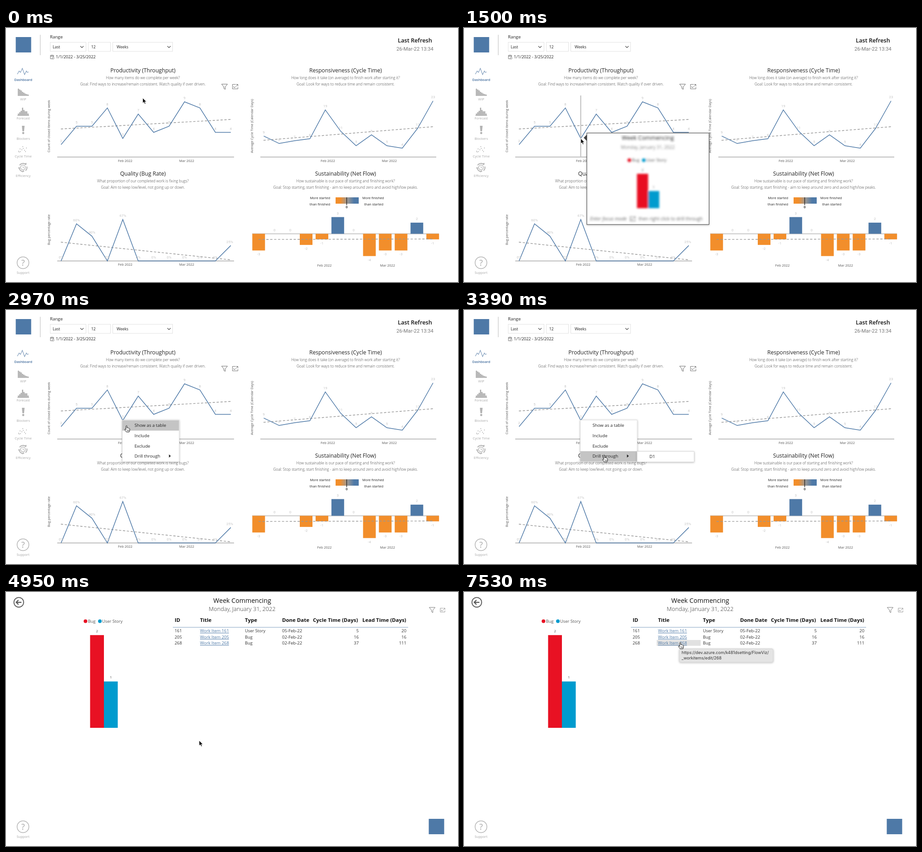
Write an HTML page that moves like this. It is 997 px wide and 561 px high and loops after 8.01 s.

```html
<!DOCTYPE html>
<html lang="en">
<head>
<meta charset="utf-8">
<title>Flow dashboard</title>
<style>
  html, body { margin: 0; width: 100%; height: 100%; overflow: hidden; background: #fff; }
  svg { display: block; width: 100%; height: 100%; font-family: "Open Sans", "Noto Sans", sans-serif; }
  .num { font-family: Roboto, "Noto Sans", sans-serif; }
  .ui { font-family: Inter, Roboto, sans-serif; }
</style>
</head>
<body>
<svg id="stage" viewBox="0 0 997 561" xmlns="http://www.w3.org/2000/svg"></svg>
<script>
const BLUE = '#4e79a7', ORANGE = '#f28e2b', RED = '#e81123', CYAN = '#009bce';
const GREY = '#b3b3b3', AXIS = '#c8c8c8', LABEL = '#c4c4c4', TREND = '#979797';
const LOOP = 8010;

// Drawing helpers
const text = (x, y, size, str, fill = '#333', more = '') =>
  `<text x="${x}" y="${y}" font-size="${size}" fill="${fill}" ${more}>${str}</text>`;
const MID = 'text-anchor="middle"', END = 'text-anchor="end"', LIGHT = 'font-weight="300"';
const rect = (x, y, w, h, fill, more = '') =>
  `<rect x="${x}" y="${y}" width="${w}" height="${h}" fill="${fill}" ${more}/>`;
const dot = (x, y, r, fill) => `<circle cx="${x}" cy="${y}" r="${r}" fill="${fill}"/>`;
const path = (d, stroke, width = 1, more = '') =>
  `<path d="${d}" fill="none" stroke="${stroke}" stroke-width="${width}" ${more}/>`;
const group = (id, body, more = '') => `<g id="${id}" ${more}>${body}</g>`;
const trend = (x1, y1, x2, y2) => path(`M${x1} ${y1}L${x2} ${y2}`, TREND, 1.4, 'stroke-dasharray="5 3.6"');
const num = (x, y, str, more = MID) => text(x, y, 8, str, LABEL, `class="num" ${more}`);

const funnel = (x, y, c) => path(`M${x - 6.5} ${y - 5.5}h13l-5 6v5.5l-3 -2v-3.5z`, c);
const focusIcon = (x, y, c, s = 1) => path('M1 -5H-6V5H6V1M2 -5H6V-1M6 -5L0 1M-3 -1V2H0', c, 1,
  `transform="translate(${x} ${y}) scale(${s})"`);
const logo = (x, y) => rect(x, y, 34, 34, BLUE);
const support = () => `<circle cx="37.5" cy="518.5" r="13" fill="none" stroke="${GREY}" stroke-width="1.5"/>`
  + text(37.5, 525, 18, '?', '#a5a5a5', MID) + text(37.5, 543, 7.5, 'Support', '#a5a5a5', MID);

function heading(x, y, title, first, second) {
  return text(x, y, 12.1, title, '#222', MID)
    + text(x, y + 15.3, 8.3, first, '#3c3c3c', `${MID} ${LIGHT}`)
    + text(x, y + 29, 8.3, second, '#3c3c3c', `${MID} ${LIGHT}`);
}
const axisTitle = (x, y, str) => text(0, 0, 7.2, str, '#555', `${MID} transform="translate(${x} ${y}) rotate(-90)"`);
const months = (a, b, y) => text(a, y, 7.5, 'Feb 2022', '#555', MID) + text(b, y, 7.5, 'Mar 2022', '#555', MID);

function lineChart(x0, step, base, unit, values, slope, unitName = '') {
  const at = values.map((v, i) => [x0 + i * step, base - unit * v]);
  const labels = at.map(([x, y], i) => {
    const last = unitName && i === values.length - 1;
    return num(last ? x + 5 : x, y - 5.6, Math.round(values[i]) + unitName, last ? END : MID);
  });
  return trend(...slope) + path('M' + at.map(p => p.join(' ')).join('L'), BLUE, 1.5) + labels.join('');
}
const axis = (x1, x2, y) => path(`M${x1} ${y}H${x2}`, AXIS, 2.4);

function barChart(values) {
  const base = 454.5, unit = 12.3;
  let out = path(`M543 ${base}H955`, AXIS, 2);
  values.forEach((v, i) => {
    const x = 543.3 + i * 34.9, h = Math.abs(v) * unit;
    if (v) out += rect(x, v > 0 ? base - h : base, 28, h, v > 0 ? BLUE : ORANGE);
    out += num(x + 14, v < 0 ? base + h + 11 : base - h - 5.8, v);
  });
  return out + trend(557, 467, 941, 466);
}

function sidebar() {
  const names = ['WIP', 'Forecast', 'Blockers', 'Cycle Time', 'Efficiency'];
  const rows = [159.5, 202, 246.5, 286, 329];
  const bars = (x, y, hs) => hs.map((h, i) => rect(x + i * 3.05, y - h, 2.8, h, GREY)).join('');
  const spots = [[28, 272], [32, 273], [35, 269], [31, 267], [38, 266], [41, 270], [43, 273], [37, 262], [45, 265], [29, 274]];
  return path('M25 102l4 -7 3 3 4 -9 5 14 4 -8 2 3 3 -1', '#7d9abb', 1.2)
    + text(38, 117, 7.5, 'Dashboard', '#3f6a9b', `${MID} font-weight="600"`)
    + bars(26, 150, [16, 14, 12, 9, 7, 5, 4, 3])
    + bars(26, 193, [4, 7, 10, 17, 12, 9, 9, 4])
    + path('M25 193.5H51', GREY)
    + `<path d="M35 216h6l-1.2 12h-3.6z" fill="${GREY}"/>` + dot(38, 232, 2.4, GREY)
    + spots.map(([x, y]) => dot(x, y, 1, GREY)).join('')
    + path('M30 303a9 9 0 0 1 14 -1M46 306a9 9 0 0 1 -3 9M39 317a9 9 0 0 1 -10 -8M27 309h4M44 302v-4M36 318l4 -3', GREY, 2)
    + `<circle cx="37.5" cy="308" r="5.3" fill="none" stroke="${GREY}" stroke-width="1.3"/>`
    + path('M37.5 305v3.5h3', GREY)
    + names.map((n, i) => text(38, rows[i], 7.5, n, '#a8a8a8', MID)).join('');
}

function filters() {
  const box = (x, w) => rect(x + .5, 31.5, w, 20, '#fff', 'stroke="#e2e2e2"');
  const chevron = x => path(`M${x - 3.5} 40l3.5 3.5 3.5 -3.5`, '#444', 1.1);
  return path('M75.5 15V60', '#bbb') + text(97, 22.5, 9.7, 'Range', '#222')
    + box(97, 79) + box(181, 49) + box(235, 132) + chevron(167.5) + chevron(359.5)
    + text(103, 45, 8.5, 'Last', '#222') + text(188, 45, 8.5, '12', '#222') + text(244, 45, 8.5, 'Weeks', '#222')
    + path('M104 68H98V60.500H105V64M98 62.500H105M100 59v2M103 59v2', '#666', .9)
    + '<circle cx="104" cy="66.500" r="2" fill="#fff" stroke="#666" stroke-width=".8"/>'
    + text(110, 67.2, 9, '1/1/2022 - 3/25/2022', '#222')
    + text(902, 31.5, 12.7, 'Last Refresh', '#111', `${MID} font-weight="600"`)
    + text(902, 50, 11.2, '26-Mar-22 13:34', '#777', `${MID} class="num"`);
}

function legend() {
  return rect(727, 374, 51, 14, 'url(#ramp)') + path('M751.500 374V391', '#222', 1.4)
    + text(751.5, 398, 7.8, '0', '#111', `${MID} font-weight="600"`)
    + text(715, 378, 7.4, 'More started', '#222', END) + text(715, 392, 7.4, 'than finished', '#222', END)
    + text(786, 378, 7.4, 'More finished', '#222') + text(790, 392, 7.4, 'than started', '#222');
}

function dashboard() {
  return logo(21.5, 20) + filters() + sidebar() + support()
    + heading(302, 98, 'Productivity (Throughput)', 'How many items do we complete per week?',
      'Goal: Find ways to increase/remain consistent. Watch quality if over driven.')
    + heading(749, 97.5, 'Responsiveness (Cycle Time)', 'How long does it take (on average) to finish work after starting it?',
      'Goal: Look for ways to reduce time and remain consistent.')
    + heading(302, 326, 'Quality (Bug Rate)', 'What proportion of our completed work is fixing bugs?',
      'Goal: Aim to keep low/level, not going up or down.')
    + heading(749, 326, 'Sustainability (Net Flow)', 'How sustainable is our pace of starting and finishing work?',
      'Goal: Stop starting, start finishing - aim to keep around zero and avoid high/low peaks.')
    + funnel(482, 129.5, '#666') + focusIcon(505.5, 129.5, '#777')
    + axisTitle(96.5, 217, 'Count of closed items during week')
    + axisTitle(544.5, 216.5, 'Average Cycle Time (Calendar Days)')
    + axisTitle(96.5, 445.5, 'Bug percentage rate')
    + axis(113, 503, 285) + axis(561, 949, 285) + axis(113, 503, 514.5)
    + lineChart(121.5, 34.03, 284.5, 13.5, [2, 5, 5, 8, 3, 7, 4, 5, 9, 8, 4, 4], [121, 223, 496, 202])
    + lineChart(568.5, 33.95, 287.5, 5.5, [8.9, 5.9, 7, 7.8, 19.4, 10.8, 5, 9.4, 5, 4, 12, 23], [568, 248, 942, 218])
    + lineChart(121.5, 34.03, 514.5, 1.366, [0, 60, 40, 0, 67, 0, 0, 0, 0, 0, 0, 25], [121, 473, 496, 512], '%')
    + months(263, 398.5, 296) + months(710, 845.5, 296) + months(263, 398.5, 525) + months(702.5, 841.5, 526.5)
    + legend() + barChart([-3, 0, 0, -2, -1, 3, 0, -4, -3, -3, 2, -1])
    + group('guide', path('M257.500 149V284', '#b5b5b5', 1.8));
}

// Work item counts: legend and two bars
function countChart(x, y, barX, barW, base, unit) {
  return dot(x, y, 4, RED) + text(x + 5.5, y + 3.2, 9.3, 'Bug', '#555')
    + dot(x + 31.8, y, 4, CYAN) + text(x + 36.8, y + 3.2, 9.3, 'User Story', '#555')
    + rect(barX, base - 2 * unit, barW, 2 * unit, RED) + rect(barX + barW, base - unit, barW, unit, CYAN)
    + text(barX + barW / 2, base - 2 * unit - 6.3, 8, '2', '#555', MID)
    + text(barX + barW * 1.5, base - unit - 6.3, 8, '1', '#555', MID);
}

function popup() {
  return '<path d="M271.500 235l-7.500 7.500 7.500 7.500z" fill="#444"/>'
    + rect(271, 232, 269.5, 202, '#fff', 'stroke="#3a3a3a" filter="url(#shade)"')
    + group('details', text(405.5, 246.5, 12.8, 'Week Commencing', '#222', MID)
      + text(405.5, 267, 10.3, 'Monday, January 31, 2022', '#444', `${MID} ${LIGHT}`)
      + countChart(364.7, 292, 381.5, 24.6, 398, 38)
      + text(278, 425, 10.6, 'Enter focus mode', '#666', 'font-style="italic"')
      + focusIcon(372, 421.5, '#666', .95)
      + text(385, 425, 10.05, 'then right click to drill through', '#666'));
}

const ITEMS = ['Show as a table', 'Include', 'Exclude', 'Drill through'];
function contextMenu() {
  return rect(256.5, 243, 125.5, 92, '#fff', 'stroke="#d5d5d5" stroke-width=".8" filter="url(#shade)"')
    + group('pick', rect(256.5, 0, 125, 22.7, '#c4c4c4'))
    + ITEMS.map((s, i) => text(283.5, 258.2 + i * 22.7, 9.65, s, '#222')).join('')
    + '<path d="M359.500 319l4 3.500 -4 3.500z" fill="#222"/>';
}
const submenu = () => rect(382, 312.5, 125.5, 23, '#fff', 'stroke="#d5d5d5" stroke-width=".8" filter="url(#shade)"')
  + group('subPick', rect(382, 312.5, 125, 22.7, '#c4c4c4')) + text(409, 327, 9.65, 'D1', '#222');

function drillPage() {
  const bold = 'font-weight="700"';
  const rows = [
    [161, 'User Story', '05-Feb-22', 5, 20], [205, 'Bug', '02-Feb-22', 16, 16], [268, 'Bug', '02-Feb-22', 37, 111]];
  const head = [[372, 'ID'], [428, 'Title'], [527, 'Type'], [609, 'Done Date'], [677, 'Cycle Time (Days)'], [786, 'Lead Time (Days)']];
  return rect(0, 0, 997, 561, '#fff')
    + path('M34 22.800H23M27.500 17.800l-5 5 5 5', '#555', 2.2)
    + '<circle cx="28.200" cy="22.800" r="10.700" fill="none" stroke="#555" stroke-width="1.800"/>'
    + text(521, 24, 14.2, 'Week Commencing', '#111', MID)
    + text(521, 42, 12.75, 'Monday, January 31, 2022', '#333', `${MID} ${LIGHT}`)
    + funnel(940, 39.5, '#777') + focusIcon(963, 40, '#888', .85)
    + countChart(175.3, 64.5, 185.5, 30.5, 300, 102.4)
    + head.map(([x, s]) => text(x, 66, 11.45, s, '#111', bold)).join('')
    + path('M368 78H887', '#7f9dc0', 1.2)
    + group('cell', rect(425, 106, 97, 12.8, '#e1e1e1'))
    + rows.map(([id, type, done, cycle, lead], i) => {
      const y = 89.3 + i * 13.5;
      return text(372, y, 9.3, id) + text(428, y, 9.4, 'Work Item ' + id, BLUE, 'text-decoration="underline"')
        + text(527, y, 9.3, type) + text(609, y, 9.55, done)
        + text(778, y, 9.4, cycle, '#333', END) + text(883, y, 9.4, lead, '#333', END);
    }).join('')
    + support() + logo(932.5, 501)
    + group('hint', rect(475, 125.5, 207, 29.5, '#e4e4e4', 'rx="3" stroke="#cfcfcf" stroke-width=".8" filter="url(#shade)"')
      + text(480, 137, 9.1, 'https://dev.azure.com/k481dsetting/FlowViz/', '#333', 'class="ui"')
      + text(480, 149, 9.1, '_workitems/edit/268', '#333', 'class="ui"'));
}

const pointer = '<path d="M0 0V11.500L2.700 9.100 4.600 13.300 6.600 12.400 4.800 8.400H8.300Z" fill="#111" stroke="#fff" stroke-width=".8"/>';
const hand = '<path d="M-1.200 1.200C-1.200 -.4 1.200 -.4 1.200 1.200V5.200C2 4.400 3.200 4.700 3.500 5.500 4.300 5 5.300 5.300 5.500 6.200 6.400 5.900 7.200 6.500 7.200 7.500V10.500L6 14H-.2L-3.800 9.200C-4.500 7.800 -3 7 -2.200 8L-1.200 9Z" fill="#fff" stroke="#111" stroke-width="1"/>'
  + '<path d="M1.500 9v3M3.300 9v3M5 9v3" stroke="#111" stroke-width=".7"/>';

document.getElementById('stage').innerHTML = `<defs>
  <linearGradient id="ramp"><stop stop-color="${ORANGE}"/><stop offset=".2" stop-color="${ORANGE}"/>
    <stop offset=".5" stop-color="#a09a94"/><stop offset=".8" stop-color="${BLUE}"/><stop offset="1" stop-color="${BLUE}"/></linearGradient>
  <filter id="shade" x="-10%" y="-20%" width="120%" height="150%"><feDropShadow dx="0" dy="1" stdDeviation="2" flood-opacity=".28"/></filter>
  <filter id="soft"><feGaussianBlur id="blur" stdDeviation="0"/></filter></defs>`
  + group('dash', dashboard() + group('menu', contextMenu()) + group('sub', submenu()) + group('tip', popup()))
  + group('drill', drillPage())
  + group('cursor', group('arrow', pointer) + group('hand', hand));

const el = {};
document.querySelectorAll('#stage [id]').forEach(n => el[n.id] = n);

// Timeline
const clamp = v => Math.max(0, Math.min(1, v));
const ramp = (t, a, b) => clamp((t - a) / (b - a));
const ease = p => p * p * (3 - 2 * p);
const show = (node, on) => node.setAttribute('display', on ? 'inline' : 'none');
const fade = (node, o) => { show(node, o > 0); node.setAttribute('opacity', o); };

const START = [301.5, 154.5];
const MOVES = [
  [480, 840, 257.5, 244], [2490, 2520, 258.5, 244.5], [2850, 3360, 309.5, 321.5],
  [3720, 4260, 426, 328], [5370, 6150, 477, 111.5]];
const PAGE = 4410;

function cursorAt(t) {
  let [x, y] = START;
  for (const [a, b, tx, ty] of MOVES) {
    const p = ease(ramp(t, a, b));
    x += (tx - x) * p;
    y += (ty - y) * p;
  }
  return [x, y];
}

function render(t) {
  const [x, y] = cursorAt(t);
  const onDrill = t >= PAGE;
  show(el.dash, !onDrill);
  show(el.drill, onDrill);
  show(el.guide, t >= 810 && t < 2490);

  const swap = ramp(t, 2475, 2685);
  fade(el.tip, t < 1500 ? 0 : 1 - swap);
  const blur = 2 * (1 - ramp(t, 1500, 1620));
  if (blur > 0) el.details.setAttribute('filter', 'url(#soft)');
  else el.details.removeAttribute('filter');
  el.blur.setAttribute('stdDeviation', blur);

  fade(el.menu, swap);
  const row = Math.max(0, Math.min(3, Math.floor((y - 243.5) / 22.7)));
  const inSub = x >= 382;
  el.pick.setAttribute('transform', `translate(0 ${243.7 + row * 22.7})`);
  show(el.pick, !inSub);
  show(el.sub, t >= 3270);
  show(el.subPick, inSub);

  show(el.cell, y < 119);
  fade(el.hint, ramp(t, 7390, 7530));

  const isHand = onDrill ? t >= 6270 : t >= 2490;
  show(el.cursor, t < 4290 || onDrill);
  show(el.hand, isHand);
  show(el.arrow, !isHand);
  el.cursor.setAttribute('transform', `translate(${x.toFixed(2)} ${y.toFixed(2)})`);
}

const began = performance.now();
function tick() {
  render((performance.now() - began) % LOOP);
  requestAnimationFrame(tick);
}
tick();
</script>
</body>
</html>
```
